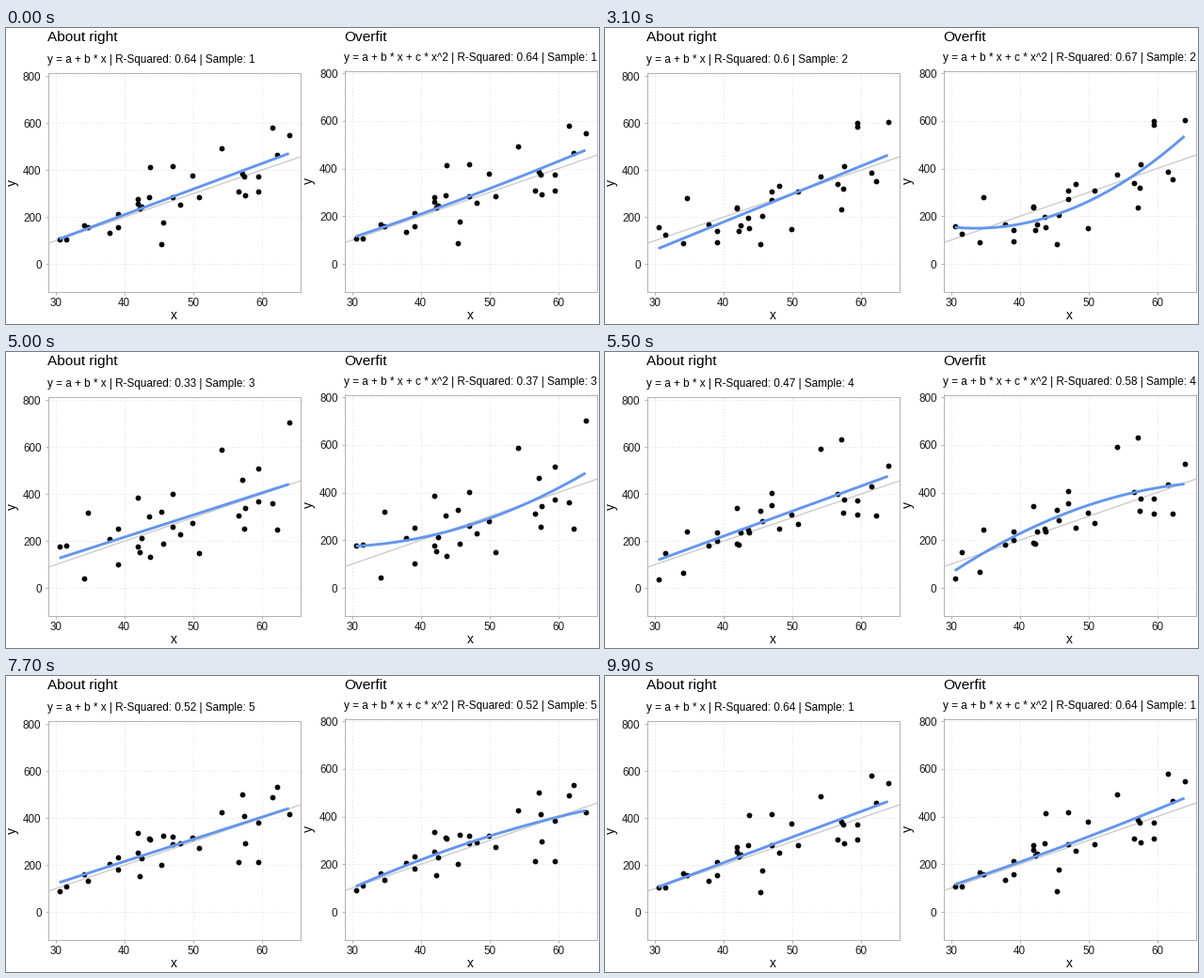
A matplotlib script that plays this animation: 630x315 px, repeating every 10000 ms.

```python
import numpy as np
import matplotlib.pyplot as plt
from matplotlib.animation import FuncAnimation

W, H, DPI = 630, 315, 100
PT = 72 / DPI  # points per pixel
FRAMES, INTERVAL = 100, 100
FADE_STARTS = (10, 30, 49, 69, 89)  # last still frame of each sample
FADE_LEN = 10

plt.rcParams["font.family"] = "Liberation Sans"

X = np.array([
    30.55, 31.5, 34.1, 34.75, 37.85, 39.1, 39.1, 42, 42, 42.3,
    42.5, 43.55, 43.8, 45.35, 45.6, 47, 47.1, 48.1, 49.85, 50.9,
    54.2, 56.6, 57.15, 57.4, 57.65, 59.55, 59.55, 61.55, 62.2, 63.97])

S1 = [106, 106, 164, 158, 134, 158, 213, 259, 279, 237,
      245, 287, 413, 86, 178, 417, 285, 255, 377, 285,
      493, 309, 385, 374, 293, 309, 373, 581, 465, 547]
S2 = [151, 120, 95, 275, 162, 149, 74, 222, 242, 140,
      160, 182, 159, 57, 209, 277, 297, 347, 138, 328,
      350, 346, 214, 330, 425, 589, 624, 393, 368, 589]
S3 = [207, 187, 39, 336, 217, 74, 263, 395, 176, 148,
      210, 316, 115, 326, 168, 233, 411, 223, 271, 126,
      588, 292, 426, 241, 335, 535, 382, 345, 236, 740]
S4 = [-75, 123, 84, 181, 155, 348, 159, 308, 200, 211,
      255, 206, 316, 329, 362, 520, 317, 275, 342, 369,
      596, 473, 768, 377, 403, 265, 264, 493, 361, 376]
S5 = [132, 106, 179, 124, 218, 204, 187, 239, 370, 138,
      223, 340, 306, 168, 315, 269, 281, 298, 313, 250,
      382, 150, 434, 417, 267, 411, 200, 490, 576, 429]
SAMPLES = [np.array(s, float) for s in (S1, S2, S3, S4, S5)]

XLIM, YLIM = (28.88, 65.64), (-116, 810)
GRID_X = np.linspace(X[0], X[-1], 80)

fig = plt.figure(figsize=(W / DPI, H / DPI), dpi=DPI, facecolor="white")


def label(x, y, text, size, **kw):
    """Place text at pixel coordinates measured from the top left."""
    return fig.text(x / W, 1 - y / H, text, fontsize=size * PT,
                    color="black", **kw)


class Panel:
    def __init__(self, left, top, title, formula, degree, scores):
        self.formula, self.degree, self.scores = formula, degree, scores
        bottom, width = 280.5, 268.3
        ax = fig.add_axes([left / W, 1 - bottom / H,
                           width / W, (bottom - top) / H])
        ax.set(xlim=XLIM, ylim=YLIM, xticks=range(30, 61, 10),
               yticks=range(0, 801, 200))
        ax.set_axisbelow(True)
        ax.grid(color="#e8e8e8", lw=0.9 * PT, ls=(0, (2, 2)))
        ax.tick_params(length=3 * PT, width=PT, color="#b3b3b3", pad=4 * PT,
                       labelsize=11.6 * PT, labelcolor="#1a1a1a")
        for spine in ax.spines.values():
            spine.set(color="#b3b3b3", linewidth=PT)

        ends = np.array(XLIM)
        ax.plot(ends, 10 * ends - 200, color="#cccccc", lw=1.4 * PT, zorder=2)
        self.dots, = ax.plot([], [], "o", color="black", ms=5.8 * PT,
                             mew=0, zorder=3)
        self.fit, = ax.plot([], [], color="#6495ed", lw=2.9 * PT, zorder=4,
                            solid_capstyle="butt")

        label(left - 0.5, 14.3, title, 15.4)
        self.subtitle = label(left - 0.5, top - 11, "", 11.72)
        label(left + width / 2, 309.5, "x", 13.8, ha="center")
        label(left - 37.5, (top + bottom) / 2, "y", 13.8, rotation=90,
              ha="center", va="center")

    def show(self, y, nearest):
        self.dots.set_data(X, y)
        self.fit.set_data(GRID_X, np.polyval(np.polyfit(X, y, self.degree),
                                             GRID_X))
        self.subtitle.set_text(f"{self.formula} | R-Squared: "
                               f"{self.scores[nearest]} | "
                               f"Sample: {nearest + 1}")


panels = [
    Panel(44.5, 48.5, "About right", "y = a + b * x", 1,
          (0.64, 0.6, 0.33, 0.47, 0.52)),
    Panel(359.5, 45.5, "Overfit", "y = a + b * x + c * x^2", 2,
          (0.64, 0.67, 0.37, 0.58, 0.52)),
]


def draw(frame):
    done = [min(max((frame - s) / FADE_LEN, 0), 1) for s in FADE_STARTS]
    pos = sum(done)
    i = int(pos + 1e-9)
    t = max(pos - i, 0)
    a, b = i % 5, (i + 1) % 5
    y = (1 - t) * SAMPLES[a] + t * SAMPLES[b]
    for panel in panels:
        panel.show(y, b if t > 0.499 else a)
    return []


anim = FuncAnimation(fig, draw, frames=FRAMES, interval=INTERVAL,
                     init_func=lambda: draw(0), repeat=True, repeat_delay=0)
plt.show()
```
